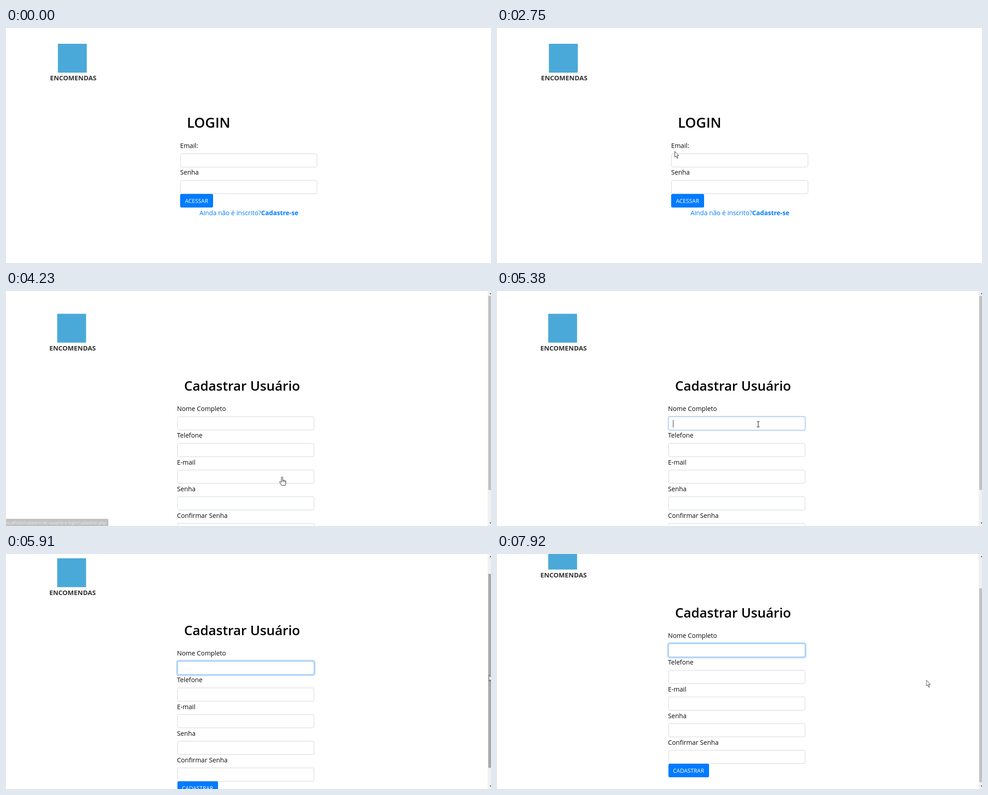
An HTML page for the animation above (8000 ms loop, 1075x521 px).

```html
<!DOCTYPE html>
<html lang="pt-BR">
<head>
<meta charset="utf-8">
<title>Login</title>
<style>
html, body { margin: 0; width: 100%; height: 100%; overflow: hidden; background: #fff; }
svg { display: block; width: 100%; height: 100%; }
text { font: 14.2px "Open Sans", "Noto Sans", sans-serif; fill: #0a0a0a; }
.title { font-size: 29.4px; font-weight: 600; fill: #000; }
.title.short { font-size: 30.8px; }
.button { fill: #007bff; }
.caption { font-size: 12.4px; fill: #fff; }
.brand { font-size: 14.6px; font-weight: 700; fill: #333; text-anchor: middle; }
.link { fill: #007bff; }
.link tspan { font-size: 14.1px; font-weight: 700; }
.link.over { fill: #0056b3; text-decoration: underline; }
.field { fill: #fff; stroke: #ced4da; }

/* One 8 s clock: "cut" jumps between states, "glide" moves smoothly. */
.cut { animation: 8s step-end infinite; }
.glide { animation: 8s linear infinite; }

.login { animation-name: login; }
.signup { animation-name: signup; }
.plain { animation-name: plain; }
.over { animation-name: over; }
.status { animation-name: status; }
.status text { font-size: 9.2px; fill: #c8c8c8; text-anchor: end; }
.page { animation-name: scroll; }
.thumb { animation-name: thumb; }
.ring { fill: none; stroke: #bfdeff; animation-name: ring; }
.focus { fill: none; stroke: #80bdff; animation-name: focus; }
.caret { animation-name: caret; }
.cursor { animation-name: path; }
.arrow { animation-name: arrow; }
.hand { animation-name: hand; }
.beam { animation-name: beam; }

@keyframes login { 0% { opacity: 1 } 49.1%, 100% { opacity: 0 } }
@keyframes signup { 0% { opacity: 0 } 49.1%, 100% { opacity: 1 } }
@keyframes plain { 0% { opacity: 1 } 40% { opacity: 0 } 41.1% { opacity: 1 } 43.1%, 100% { opacity: 0 } }
@keyframes over { 0% { opacity: 0 } 40% { opacity: 1 } 41.1% { opacity: 0 } 43.1%, 100% { opacity: 1 } }
@keyframes status {
  0%, 45% { opacity: 0 }
  46.5%, 51.6% { opacity: 1 }
  53.4%, 100% { opacity: 0 }
}
@keyframes scroll {
  0% { transform: none }
  72.95% { transform: translateY(-18px) }
  73.85% { transform: translateY(-41px) }
  74.85% { transform: translateY(-64px) }
  75.85%, 100% { transform: translateY(-80px) }
}
@keyframes thumb {
  0% { transform: none; fill: #c1c1c1 }
  70.8% { transform: none; fill: #a8a8a8 }
  72.95% { transform: translateY(14.5px); fill: #a8a8a8 }
  73.85% { transform: translateY(33px); fill: #a8a8a8 }
  74.85% { transform: translateY(52px); fill: #a8a8a8 }
  75.85% { transform: translateY(65px); fill: #a8a8a8 }
  79.7%, 100% { transform: translateY(65px); fill: #c1c1c1 }
}
@keyframes ring { 0%, 66.3% { stroke-width: 0 } 68.2%, 100% { stroke-width: 6.6px } }
@keyframes focus { 0%, 66.3% { opacity: 0 } 68.2%, 100% { opacity: 1 } }
@keyframes caret {
  0% { opacity: 0 } 66.3% { opacity: 1 }
  72.95% { opacity: 0 } 79.7% { opacity: 1 }
  86.3% { opacity: 0 } 92.1% { opacity: 1 }
  98.95%, 100% { opacity: 0 }
}
@keyframes path {
  0%, 10% { transform: translate(865px, 495px) }
  12%, 14% { transform: translate(781px, 451px) }
  14.9% { transform: translate(792px, 447px) }
  19% { transform: translate(650px, 368px) }
  22.7%, 26.5% { transform: translate(507px, 293.5px) }
  26.7%, 32.5% { transform: translate(506.5px, 293.5px) }
  34.3%, 34.7% { transform: translate(394px, 273.5px) }
  36.3% { transform: translate(388px, 300px) }
  38.3% { transform: translate(430px, 356px) }
  40.3% { transform: translate(530px, 412px) }
  41.3% { transform: translate(585px, 439px) }
  42.2% { transform: translate(604px, 433px) }
  43.2% { transform: translate(609px, 418px) }
  45.1%, 53% { transform: translate(612px, 412.5px) }
  61.5% { transform: translate(590px, 322px) }
  63.4% { transform: translate(583px, 304px) }
  65%, 67.4% { transform: translate(579px, 295.5px) }
  69% { transform: translate(760px, 280px) }
  70.8% { transform: translate(1070.5px, 237px) }
  72.9% { transform: translate(1070.5px, 250px) }
  73.8%, 74% { transform: translate(1070.5px, 268.5px) }
  75.9%, 78.7% { transform: translate(1070.5px, 301px) }
  82.6%, 100% { transform: translate(951.5px, 279.5px) }
}
@keyframes arrow {
  0% { opacity: 0 } 10% { opacity: 1 }
  22% { opacity: 0 } 33.2% { opacity: 1 }
  40% { opacity: 0 } 41.1% { opacity: 1 }
  43.1% { opacity: 0 } 54.5% { opacity: 1 }
  57.3% { opacity: 0 } 60.1% { opacity: 1 }
  62.8% { opacity: 0 } 68.4%, 100% { opacity: 1 }
}
@keyframes hand {
  0% { opacity: 0 } 40% { opacity: 1 }
  41.1% { opacity: 0 } 43.1% { opacity: 1 }
  53.6%, 100% { opacity: 0 }
}
@keyframes beam {
  0% { opacity: 0 } 22% { opacity: 1 }
  33.2% { opacity: 0 } 53.6% { opacity: 1 }
  54.5% { opacity: 0 } 57.3% { opacity: 1 }
  60.1% { opacity: 0 } 62.8% { opacity: 1 }
  68.4%, 100% { opacity: 0 }
}
</style>
</head>
<body>
<svg viewBox="0 0 1075 521" preserveAspectRatio="none">
  <defs>
    <rect id="box" width="302.5" height="29.5" rx="3"/>
    <g id="logo">
      <rect x="115" y="35" width="64" height="64" fill="#4aa9d8"/>
      <text class="brand" x="149" y="116">ENCOMENDAS</text>
    </g>
  </defs>

  <g class="login cut">
    <use href="#logo"/>
    <text class="title short" x="401" y="221">LOGIN</text>
    <text x="386" y="266.3">Email:</text>
    <use class="field" href="#box" x="386.75" y="278.75"/>
    <text x="386" y="325.4">Senha</text>
    <use class="field" href="#box" x="386.75" y="337.85"/>
    <rect class="button" x="386" y="368" width="73" height="30" rx="3"/>
    <text class="caption" x="396.7" y="387.7">ACESSAR</text>
    <text class="link plain cut" x="428.7" y="414.6">Ainda não é inscrito?<tspan>Cadastre-se</tspan></text>
    <text class="link over cut" x="428.7" y="414.6">Ainda não é inscrito?<tspan>Cadastre-se</tspan></text>
  </g>

  <g class="signup cut">
    <g class="page cut">
      <use href="#logo" x="-1.5" y="15.5"/>
      <text class="title" x="394.8" y="221">Cadastrar Usuário</text>
      <text x="379" y="266.3">Nome Completo</text>
      <use class="ring glide" href="#box" x="380.25" y="278.75"/>
      <use class="field" href="#box" x="380.25" y="278.75"/>
      <use class="focus glide" href="#box" x="380.25" y="278.75"/>
      <path class="caret cut" d="M390.5 286V302.5" stroke="#222"/>
      <text x="379" y="325.4">Telefone</text>
      <use class="field" href="#box" x="380.25" y="337.85"/>
      <text x="379" y="384.5">E-mail</text>
      <use class="field" href="#box" x="380.25" y="396.95"/>
      <text x="379" y="443.6">Senha</text>
      <use class="field" href="#box" x="380.25" y="456.05"/>
      <text x="379" y="502.7">Confirmar Senha</text>
      <use class="field" href="#box" x="380.25" y="515.15"/>
      <rect class="button" x="380" y="545" width="90" height="30" rx="3"/>
      <text class="caption" x="390" y="564.9">CADASTRAR</text>
    </g>
    <rect x="1067.5" width="8" height="521" fill="#f1f1f1"/>
    <rect class="thumb cut" x="1069" y="11" width="6" height="430"/>
    <path d="M1071.5 7L1076 2.5V7ZM1071.5 513L1076 517.5V513Z" fill="#606060"/>
  </g>

  <g class="status glide">
    <path d="M0 505H224Q227 505 227 508V521H0Z" fill="#2b2b2d"/>
    <text x="222" y="516.8">localhost/cadastro-de-usuario-e-login/cadastrar.php</text>
  </g>

  <g class="cursor glide" fill="#fff" stroke="#1a1a24" stroke-linejoin="round">
    <path class="arrow cut" d="M0 0V13L3 10.3L5.2 15.5L7.3 14.6L5.1 9.6H9Z" stroke-width=".9"/>
    <path class="hand cut" d="M-1.6 11V1.2a1.5 1.5 0 0 1 3 0V7.5q1.4-1.2 2.6.3 1.4-.9 2.4.5 1.8-.4 1.8 1.6V13q0 2.5-1.6 5.5H-1.2Q-2.6 15-5.4 11.6q-.6-1.6.8-1.9 1.4-.1 3 2ZM1.4 7.5V10.5M4 7.8V10.5M6.4 8.3V10.8"/>
    <path class="beam cut" d="M-3-6H-1L0-5.2L1-6H3M0-5.2V5.2M-3 6H-1L0 5.2L1 6H3" fill="none" stroke-width="1.1"/>
  </g>
</svg>
</body>
</html>
```
